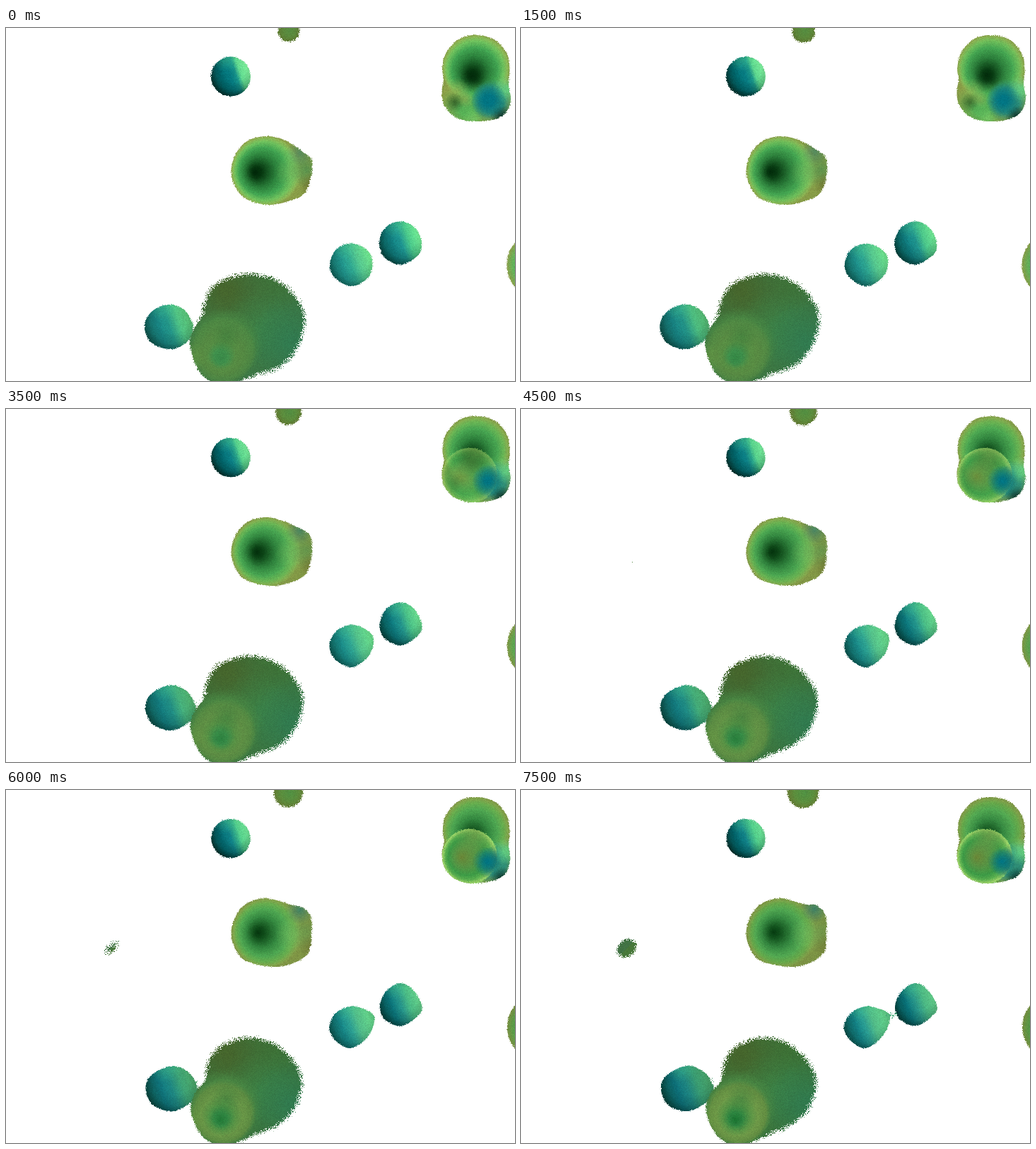
An HTML page with a canvas that plays this animation: 720x499 px, repeating every 8 s.

```html
<!DOCTYPE html>
<html lang="en">
<head>
<meta charset="utf-8">
<title>Metaballs</title>
<style>
html, body { margin: 0; width: 100%; height: 100%; overflow: hidden; background: #fff; }
canvas { display: block; width: 720px; height: 499px; }
</style>
</head>
<body>
<canvas id="view" width="720" height="499"></canvas>
<script>
const W = 720, H = 499, STEP = 500, STEPS = 16;
const view = document.getElementById('view').getContext('2d');
const sheet = document.createElement('canvas');
sheet.width = W; sheet.height = H;
const g = sheet.getContext('2d', { willReadFrequently: true });
const out = view.createImageData(W, H);
const px = new Uint32Array(out.data.buffer);

let u = 0, step = 0;
const lerp = (a, b) => a + (b - a) * u;
const clamp = v => Math.max(0, Math.min(1, v));
const rgb = hex => [0, 2, 4].map(i => parseInt(hex.substr(i, 2), 16));
const rgba = (hex, a) => `rgba(${rgb(hex)},${a})`;

function mix(a, b = a) {
  const p = rgb(a), q = rgb(b);
  return `rgb(${p.map((v, i) => Math.round(lerp(v, q[i])))})`;
}

function hash(x, y, s) {
  let h = Math.imul(x, 374761393) + Math.imul(y, 668265263) + Math.imul(s, 974634777);
  h = Math.imul(h ^ (h >>> 13), 1274126177);
  h = Math.imul(h ^ (h >>> 16), 2246822519 | 0);
  return ((h ^ (h >>> 15)) >>> 0) / 4294967296;
}

// Closed smooth curve; each point is [x, y] or [x, y, endX, endY].
function outline(pts) {
  const p = pts.map(([x, y, x2 = x, y2 = y]) => [lerp(x, x2), lerp(y, y2)]);
  const at = i => p[(i + p.length) % p.length];
  const path = new Path2D();
  path.moveTo(...p[0]);
  p.forEach((b, i) => {
    const a = at(i - 1), c = at(i + 1), d = at(i + 2);
    path.bezierCurveTo(
      b[0] + (c[0] - a[0]) / 6, b[1] + (c[1] - a[1]) / 6,
      c[0] - (d[0] - b[0]) / 6, c[1] - (d[1] - b[1]) / 6, c[0], c[1]);
  });
  return path;
}

function circle(x, y, r) {
  const path = new Path2D();
  path.arc(x, y, r, 0, Math.PI * 2);
  return path;
}

function inside(path, paint) {
  g.save();
  g.clip(path);
  paint();
  g.restore();
}

function addStops(grad, stops) {
  for (const [at, a, b] of stops) grad.addColorStop(at, mix(a, b));
  return grad;
}

function flood(style) {
  g.fillStyle = style;
  g.fillRect(0, 0, W, H);
}

function cone(x0, y0, x1, y1, r, stops) {
  flood(addStops(g.createRadialGradient(x0, y0, 0, x1, y1, r), stops));
}

function glow(x, y, r, hex, a = 1, core = 0) {
  const grad = g.createRadialGradient(x, y, 0, x, y, r);
  grad.addColorStop(0, rgba(hex, a));
  grad.addColorStop(core, rgba(hex, a));
  grad.addColorStop(core + (1 - core) / 2, rgba(hex, a / 2));
  grad.addColorStop(1, rgba(hex, 0));
  g.fillStyle = grad;
  g.fillRect(x - r, y - r, r * 2, r * 2);
}

function ball(path, x, y, r, stops, shade) {
  inside(path, () => {
    const dx = r * 0.92, dy = -r * 0.32;
    flood(addStops(g.createLinearGradient(x - dx, y - dy, x + dx, y + dy), stops));
    const rim = g.createRadialGradient(x + r * 0.22, y - r * 0.3, r * 0.55, x + r * 0.16, y - r * 0.22, r * 1.3);
    rim.addColorStop(0, 'rgba(0,30,25,0)');
    rim.addColorStop(0.55, `rgba(0,30,25,${shade * 0.3})`);
    rim.addColorStop(1, `rgba(0,25,18,${shade})`);
    flood(rim);
    glow(x - r * 0.25, y - r * 0.95, r * 0.7, '48c890', 0.5);
  });
}

const CUP = [
  [0, '002608', '063a10'], [0.15, '06360f', '11501c'], [0.45, '2a7e3a', '378a42'],
  [0.68, '42a552', '52a852'], [0.84, '70c25e', '66a84a'], [0.94, '8cb856', '7ea04a'],
  [1, '8a9e48', '7c9344']
];

function balls() {
  ball(circle(318, 68.5, lerp(28, 27.5)), 318, 68.5, 28, [
    [0, '0a6464'], [0.25, '006e74', '026c74'], [0.5, '067c82', '128288'],
    [0.64, '169088', '36ae88'], [0.76, '62da90', '54d08c'], [1, '80f09c', '6cdc92']
  ], 0.85);

  ball(outline([[458, 335, 457, 336], [467, 313, 466, 316], [489, 304.5, 487, 306],
    [510, 313, 506, 309], [518.5, 330, 522, 319], [513, 352, 513, 346],
    [490, 365, 488, 365], [466, 354]]), 488, 335, 31, [
    [0, '167e76', '106c68'], [0.3, '229890', '14868a'], [0.5, '30a890', '2c9e92'],
    [0.7, '56c890', '52bc88'], [1, '70e48c', '62d08a']
  ], 0.55);

  ball(outline([[528, 304, 529, 307], [536, 283, 538, 285], [556, 273.5, 558, 273],
    [577, 281, 574, 281], [587.5, 300, 587, 301], [584, 320, 586, 315],
    [559, 334.5, 561, 333], [536, 325, 537, 325]]), 558, 304, 30, [
    [0, '0c706c', '08605e'], [0.3, '128284', '0a7880'], [0.52, '1e9490', '2a9688'],
    [0.72, '4cca8c', '4cb884'], [1, '74ec94', '64cc88']
  ], 0.65);

  ball(outline([[196, 423, 198, 423], [205, 402, 206, 403], [229, 391, 235, 390],
    [252, 398, 258, 398], [264, 418, 271, 415], [264, 428, 271, 427],
    [256, 444, 261, 442], [233, 454, 236, 454], [206, 445, 209, 446]]),
    lerp(230, 234), 422, 34, [
    [0, '1a7c74', '106a64'], [0.3, '1a8a88', '0e747e'], [0.52, '249688', '1e8480'],
    [0.75, '52c484', '3a9c72'], [1, '58bc72', '46a068']
  ], 0.6);
}

function cupBlob() {
  const path = outline([[318.5, 202], [325, 178], [341, 160], [367, 153],
    [391, 157, 392, 159], [409, 167, 404, 162], [423, 178, 418, 163],
    [432, 186, 431, 178], [432, 208], [422, 234, 429, 229], [402, 244, 410, 244],
    [372, 250, 381, 250], [340, 242], [324, 224]]);
  inside(path, () => {
    cone(lerp(352, 357), lerp(204, 201), lerp(368, 369), 202, 49.5, CUP);
    glow(406, 204, 26, '80c060', lerp(0.6, 0.5));
    glow(425, 200, 26, '4c8c4c', lerp(0.8, 0.25));
    glow(432, 222, 18, '66682c', lerp(0.8, 0.45));
    glow(lerp(416, 415), lerp(176, 168), 20, '38806a', lerp(0.6, 0.9));
  });
}

function twinBlob() {
  const path = outline([[617, 58, 618, 58], [622, 36], [640, 16], [665, 10],
    [692, 17], [709, 37], [712.5, 60], [711, 80], [714, 101, 713, 98],
    [708, 118, 706, 118], [692, 129, 688, 128], [662, 132, 657, 132],
    [636, 126, 634, 125], [620, 109], [616.5, 90], [619, 73, 620, 72]]);
  inside(path, () => {
    cone(659, lerp(68, 66), 665, 57, 48, CUP);
    glow(652, 112, 38, '52b458', 0.9, 0.3);
    glow(638, 90, 20, '98b050', lerp(0.7, 0.1));
    glow(635, 105, 14, '244c1c', lerp(0.75, 0.1));
    glow(650, 101, 12, '8ca850', lerp(0.6, 0.1));
    glow(660, 128, 14, '78cc68', 0.7);
    glow(659, 74, 18, '06300e', lerp(0.55, 0.3));

    glow(lerp(688, 691), 103, 31, '2a8c78', 0.95, 0.55);
    glow(708, 87, 20, '64d484', 0.8, 0.2);
    glow(702, 126, 17, '032c2c', 0.85, 0.15);

    const a = clamp((u - 0.2) / 0.5);
    if (a > 0) {
      g.save();
      g.globalAlpha = a;
      g.clip(circle(656, 94, 39));
      cone(644, 95, 656, 94, 39, [[0, '6c8838'], [0.35, '589444'], [0.68, '3c9a46'],
        [0.85, '5cb050'], [0.95, '94cc64'], [1, 'a0e470']]);
      glow(662, 66, 28, '6c9a48', 0.8);
      glow(692, 104, 26, '1c7468', 0.9, 0.25);
      g.restore();
    }
    glow(lerp(683, 680), lerp(102, 101), lerp(25, 20), '007484', 0.95, lerp(0.3, 0.05));
  });
}

function bigBlob() {
  const path = outline([[260, 448, 262, 455], [266, 425, 268, 429],
    [277, 408, 283, 411], [282, 386, 287, 388], [298, 362, 303, 364],
    [338, 348, 340, 351], [378, 355, 376, 358], [408, 377, 404, 382],
    [422, 409, 417, 410], [414, 447, 409, 446], [390, 477, 384, 472],
    [358, 489, 352, 486], [336, 497, 330, 496], [305, 504], [275, 488, 277, 488]]);
  inside(path, () => {
    flood(mix('3c7644', '3a743c'));
    glow(310, 370, 75, '48642a', 0.85, 0.1);
    glow(360, 425, 55, '3e8a4a', 0.6);
    glow(405, 445, 62, '2e7c54', 0.75, 0.1);
    glow(385, 362, 40, '41702f', 0.5);
    glow(308, 449, 54, '4a8844', 0.9, 0.7);
    const x = 303, y = 467;
    const lobe = g.createRadialGradient(x, y, 0, 307, 456, 47);
    const a = lerp(0.7, 0.95);
    [[0, '328a4a', '16702e'], [0.2, '3c9450', '2c8440'], [0.42, '5c9044', '5a9646'],
      [0.62, '5a8a42', '709a48'], [0.85, '528a44', '648e42']].forEach(([p, c, d]) =>
      lobe.addColorStop(p, mix(c, d).replace('rgb', 'rgba').replace(')', `,${a})`)));
    lobe.addColorStop(1, rgba('588a42', 0));
    flood(lobe);
    glow(312, 436, 22, '3a7c3c', 0.55);
    glow(263, 465, 22, '6c9a44', 0.5);
  });
}

function edgeBlobs() {
  const r = lerp(15, 22);
  inside(circle(lerp(400, 399), lerp(4.5, 3.5), r), () => cone(402, 4, 400, 4, r, [
    [0, '568c40', '509244'], [0.6, '5c883c', '5c903e'], [1, '5c7830', '647c34']]));
  inside(circle(757, 335, lerp(48.7, 48)), () => cone(744, 337, 757, 335, 48.7, [
    [0, '247c3c'], [0.45, '3c9c54', '3f9049'], [0.75, '64b45c', '5a9846'],
    [1, '8ca04c', '768a3e']]));
}

// Dust that gathers into a small tilted ellipse.
function dust() {
  const age = step - 8;
  if (age < 1) return;
  const a = 13 + age * 0.6, b = Math.min(14, 2 + age * 1.7);
  const dens = age < 4 ? age * age * 0.035 : (age - 2) * 0.55;
  const c = Math.cos(-0.65), s = Math.sin(-0.65);
  for (let y = -20; y <= 20; y++) for (let x = -20; x <= 20; x++) {
    const d = Math.hypot((x * c + y * s) / a, (y * c - x * s) / b);
    if (hash(x, y, step + 50) < (1 - d) * dens) {
      g.fillStyle = (x + y) > 0 ? '#48783a' : '#427444';
      g.fillRect(149 + x, 223 + y, 1, 1);
    }
  }
}

// Sparse grains joining the two middle balls near the end.
function bridge() {
  const p = clamp((step - 12) / 3) * 0.5;
  g.fillStyle = '#4cb080';
  for (let x = 516; x < 532; x++) for (let y = 313; y < 323; y++)
    if (hash(x, y, step + 90) < p * (1 - Math.abs(y - 318) / 5)) g.fillRect(x, y, 1, 1);
}

function roughness(x, y) {
  const near = (cx, cy, r) => (x - cx) ** 2 + (y - cy) ** 2 < r * r;
  if (near(149, 223, 24)) return 0;
  if (near(308, 450, 52)) return 1;
  if (near(352, 419, 84)) return 4;
  if (near(400, 4, 28)) return 1.6;
  if (near(430, 205, 28) || near(268, 420, 12)) return 1.4;
  return 0.65;
}

function grain() {
  const src = new Uint32Array(g.getImageData(0, 0, W, H).data.buffer);
  for (let y = 0, i = 0; y < H; y++) for (let x = 0; x < W; x++, i++) {
    const amp = roughness(x, y);
    const dx = Math.round((hash(x, y, step) * 2 - 1) * amp);
    const dy = Math.round((hash(x, y, step + 200) * 2 - 1) * amp);
    const sx = Math.max(0, Math.min(W - 1, x + dx));
    const sy = Math.max(0, Math.min(H - 1, y + dy));
    const v = src[sy * W + sx];
    if ((v & 0xffffff) === 0xffffff) { px[i] = v; continue; }
    const k = 0.94 + hash(x, y, step + 400) * 0.12;
    const r = Math.min(255, (v & 255) * k);
    const gr = Math.min(255, (v >> 8 & 255) * k);
    const b = Math.min(255, (v >> 16 & 255) * k);
    px[i] = (0xff000000 | b << 16 | gr << 8 | r) >>> 0;
  }
  view.putImageData(out, 0, 0);
}

function render() {
  u = step / (STEPS - 1);
  flood('#fff');
  balls();
  cupBlob();
  twinBlob();
  bigBlob();
  edgeBlobs();
  dust();
  bridge();
  grain();
}

const start = performance.now();
let shown = -1;
function tick() {
  step = Math.floor((performance.now() - start) / STEP) % STEPS;
  if (step !== shown) {
    shown = step;
    render();
  }
  requestAnimationFrame(tick);
}
tick();
</script>
</body>
</html>
```
